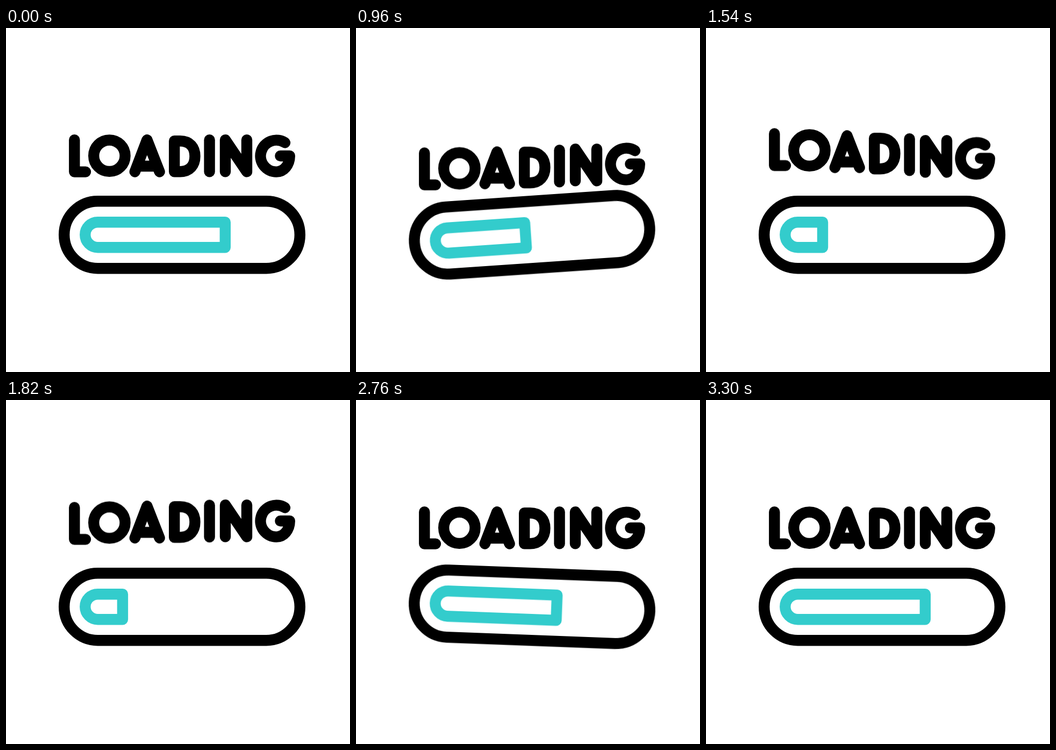
These frames come from a looping animation (640 by 640 pixels, 3.62 s). An HTML page:

```html
<!DOCTYPE html>
<html lang="en">
<head>
<meta charset="utf-8">
<title>Loading</title>
<style>
  html, body { margin: 0; width: 100%; height: 100%; overflow: hidden; background: #fff; }
  svg { display: block; width: 100vw; height: 100vh; }

  svg * {
    fill: none;
    stroke-width: 20.4;
    stroke-linecap: round;
    stroke-linejoin: round;
  }
  .letters, .bar { stroke: #000; }
  .fill { stroke: #3cc; }

  .letters *, .tilt, .fill {
    animation: 3620ms cubic-bezier(.3333, 0, .6667, 1) infinite;
  }
  .letters * { animation-name: bounce; animation-delay: calc(var(--i) * 37ms); }
  .tilt { animation-name: tilt; transform-origin: 327.5px 384.7px; }
  .fill { animation-name: fill; }

  @keyframes bounce {
    0%, 10.773% { transform: translateY(0); }
    27.624% { transform: translateY(24.5px); }
    44.475% { transform: translateY(-13px); }
    58.84%, 100% { transform: translateY(0); }
  }
  @keyframes tilt {
    0%, 16.575% { transform: rotate(0deg); }
    27.624% { transform: rotate(-4deg); }
    38.674%, 69.061% { transform: rotate(0deg); }
    80.11% { transform: rotate(3deg); }
    91.16%, 100% { transform: rotate(0deg); }
  }
  @keyframes fill {
    0% { d: path("M407.8 361.2H170.8A23.5 23.5 0 0 0 170.8 408.2H407.8Z"); }
    15.193% { d: path("M482.6 361.2H170.8A23.5 23.5 0 0 0 170.8 408.2H482.6Z"); }
    34.53%, 49.724% { d: path("M217 361.2H170.8A23.5 23.5 0 0 0 170.8 408.2H217Z"); }
    62.983% { d: path("M202.4 361.2H170.8A23.5 23.5 0 0 0 170.8 408.2H202.4Z"); }
    80.939%, 100% { d: path("M407.8 361.2H170.8A23.5 23.5 0 0 0 170.8 408.2H407.8Z"); }
  }
</style>
</head>
<body>
<svg viewBox="0 0 640 640" role="img" aria-label="LOADING">
  <g class="letters">
    <path style="--i:0" d="M127.3 208.2V267.6H148"/>
    <circle style="--i:1" cx="192.4" cy="237.7" r="29.2"/>
    <path style="--i:2" d="M239.8 267.4L262.4 208.2L285.6 267.4M246 257H279"/>
    <path style="--i:3" d="M313.2 210.2H324C342 210.2 351.5 222 351.5 238.6S342 267.2 324 267.2H313.2Z"/>
    <path style="--i:4" d="M378.6 208.2V267.4"/>
    <path style="--i:5" d="M408 267.4V208.2L448 267.4V208.2"/>
    <path style="--i:6" d="M519 213.3A29.5 29.5 0 1 0 503 267.6C517 267.6 527.6 255 527.8 238H510.4"/>
  </g>
  <g class="tilt">
    <rect class="bar" x="108.2" y="322.2" width="438.6" height="125" rx="62.5"/>
    <path class="fill" d="M407.8 361.2H170.8A23.5 23.5 0 0 0 170.8 408.2H407.8Z"/>
  </g>
</svg>
</body>
</html>
```
